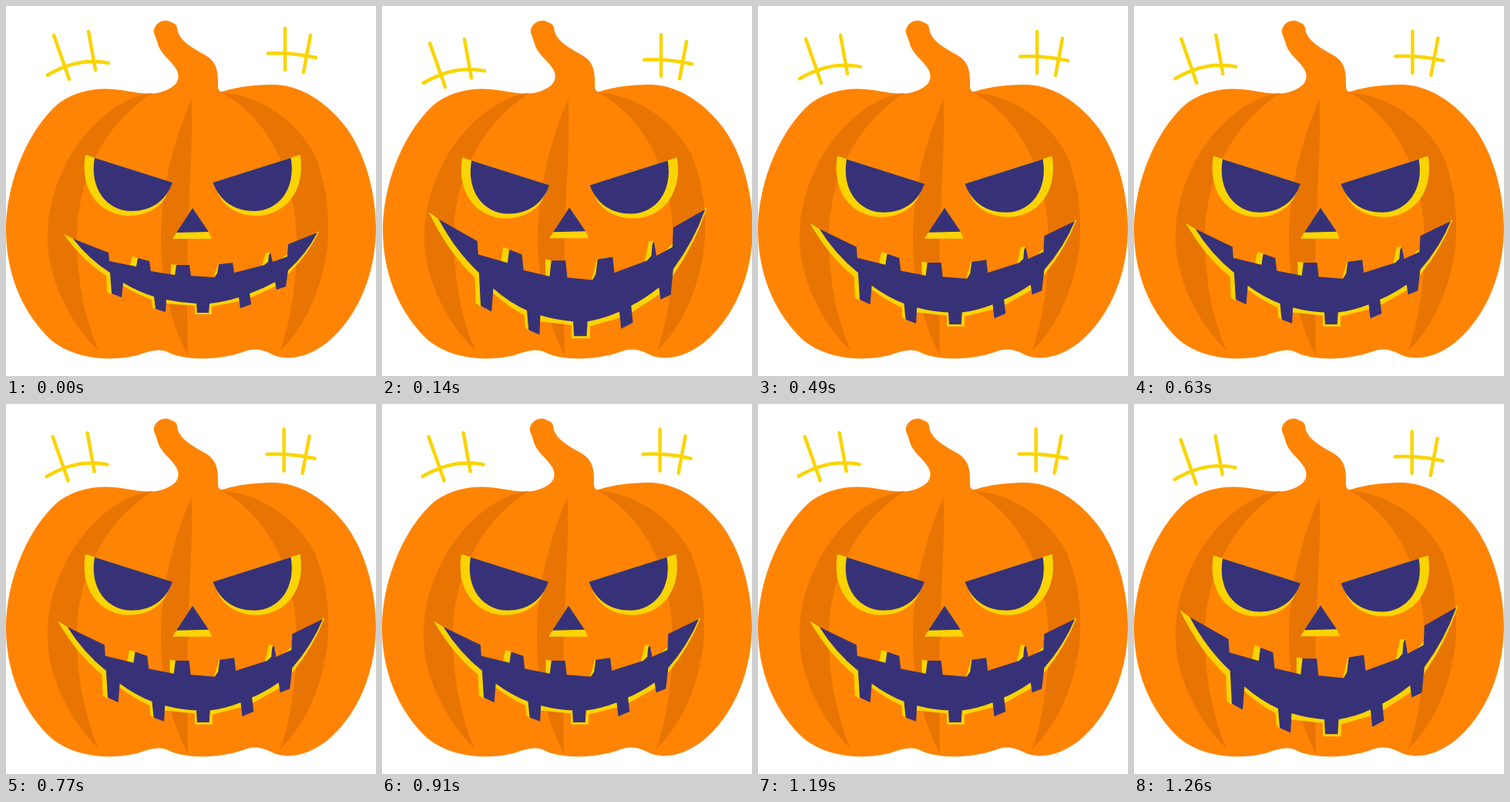
An HTML page with a canvas for the animation above (1330 ms loop, 480 by 480 pixels).

```html
<!DOCTYPE html>
<html lang="en">
<head>
<meta charset="utf-8">
<title>Laughing pumpkin</title>
<style>
html, body { margin: 0; width: 100%; height: 100%; overflow: hidden; background: #fff; }
canvas { display: block; width: 480px; height: 480px; }
</style>
</head>
<body>
<canvas id="stage" width="480" height="480"></canvas>
<script>
const ctx = document.getElementById('stage').getContext('2d');
const STEP = 70, STEPS = 19;
const ORANGE = '#ff8404', RIB = '#e87402', YELLOW = '#fad400', NAVY = '#373278';

const body = new Path2D(`M222 28C223 47 248 57 262 66C276 76 275 92 275 104Q275 112 281 111
  C303 104 325 102 350 102C388 104 420 130 440 156C466 190 480 242 480 290
  C479 350 456 400 424 430C400 453 372 461 350 454C337 448 326 441 307 449
  C276 460 233 460 212 450C199 443 186 448 171 453C136 462 82 459 52 427
  C19 392 0 345 0 290C1 220 34 154 70 125C98 106 128 105 155 110
  C171 113 187 115 200 112C217 107 229 98 221 82C213 69 200 63 196 46
  C193 37 190 33 193 28C197 19 208 17 214 21Q221 23 222 28Z`);

const leftRib = new Path2D(`M190 113C154 116 112 148 86 190C58 238 53 275 54 310
  C57 360 85 413 120 447C102 405 92 355 92 300C92 225 126 154 190 113Z`);
const middleRib = new Path2D(`M241 120C215 178 200 245 201 310C202 362 215 412 236 455
  C234 380 235 310 238 240Q242 175 241 120Z`);
const rightRib = new Path2D(`M279 112C334 117 376 149 400 192C415 228 419 260 418 300
  C414 358 390 415 356 447C370 405 378 355 377 300C374 218 344 148 279 112Z`);

const eyeGlow = new Path2D('M103 193C95 240 123 272 160 272C184 272 200 260 207 248L216 229Z');
const eye = new Path2D('M115 197L216 229C207 254 187 266 163 266C130 266 108 236 115 197Z');
const noseGlow = new Path2D('M242 262L263 293L267 302H216L221 294Z');
const nose = new Path2D('M242 262L263 293L221 294Z');

const mouth = new Path2D(`M87 302L133 320L134 331L169 338L171 327L186 331L188 344L219 349
  L221 336H238L240 350L270 352L274 347L276 335L294 333L296 346L335 336L340 332L341 323L343 320
  L346 332L365 325L366 309L404 294Q390 321 366 343L363 364L351 368L349 358Q333 367 316 373
  L318 387L304 392L302 378Q283 384 264 386L263 398H248L247 386Q227 385 208 381
  L207 397L194 393L192 377Q172 371 152 359L150 378L137 373L135 346Q107 328 87 302Z`);
const mouthGlow = new Path2D(`M75 296L87 302L160 350L240 365L330 348L404 293H406
  Q392 322 368 346L349 364L318 378L302 383L267 390V400H245V389L208 386L195 394L190 391L189 381
  Q170 374 152 363L137 374L131 371L130 350Q99 330 75 296Z`);
const toothGlows = new Path2D(`M161 336L164 325L172 327L169 339Z
  M214 348V335L222 336L220 350Z M269 352L275 335L294 333L277 347Z
  M332 337L337 320H343L341 334Z`);

const leftMarks = new Path2D('M62 38L82 95M107 33L116 83M54 89.500Q94 66 133 74');
const rightMarks = new Path2D('M362 29L362 83M395 38L386 86M340 61.500Q372 60 402 67');

function fill(path, color) {
  ctx.fillStyle = color;
  ctx.fill(path);
}

function shifted(x, y, paint) {
  ctx.save();
  ctx.translate(x, y);
  paint();
  ctx.restore();
}

function scaled(cx, cy, sx, sy, paint) {
  ctx.save();
  ctx.translate(cx, cy);
  ctx.scale(sx, sy);
  ctx.translate(-cx, -cy);
  paint();
  ctx.restore();
}

function drawEye() {
  fill(eyeGlow, YELLOW);
  fill(eye, NAVY);
}

function drawFace(open) {
  shifted(0, 3.5 * open, () => {
    drawEye();
    scaled(242.25, 0, -1, 1, drawEye);
  });
  shifted(0, -0.7 * open, () => {
    fill(noseGlow, YELLOW);
    fill(nose, NAVY);
  });
  scaled(248, 346, 1 + 0.091 * open, 1 + 0.58 * open, () => {
    fill(mouthGlow, YELLOW);
    fill(toothGlows, YELLOW);
    fill(mouth, NAVY);
  });
}

function drawMarks(step, open) {
  const drift = -1.4 * Math.min(1, Math.max(0, (step - 7) / 4));
  const drop = open * (1 - 0.2 * step / 18);
  ctx.strokeStyle = YELLOW;
  ctx.lineWidth = 4.5;
  ctx.lineCap = 'round';
  shifted(drift, 10.5 * drop, () => ctx.stroke(leftMarks));
  shifted(drift, 8.5 * drop, () => ctx.stroke(rightMarks));
}

function draw(now) {
  const step = Math.floor(now / STEP) % STEPS;
  const open = (1 - Math.cos(step * Math.PI / 2)) / 2;
  const sway = step < 7 ? 1.4 * Math.sin(step * Math.PI / 7) : 0;
  ctx.fillStyle = '#fff';
  ctx.fillRect(0, 0, 480, 480);
  shifted(sway, 0, () => {
    fill(body, ORANGE);
    for (const rib of [leftRib, middleRib, rightRib]) fill(rib, RIB);
    drawFace(open);
  });
  drawMarks(step, open);
}

const start = performance.now();
function tick() {
  draw(performance.now() - start);
  requestAnimationFrame(tick);
}
tick();
</script>
</body>
</html>
```
